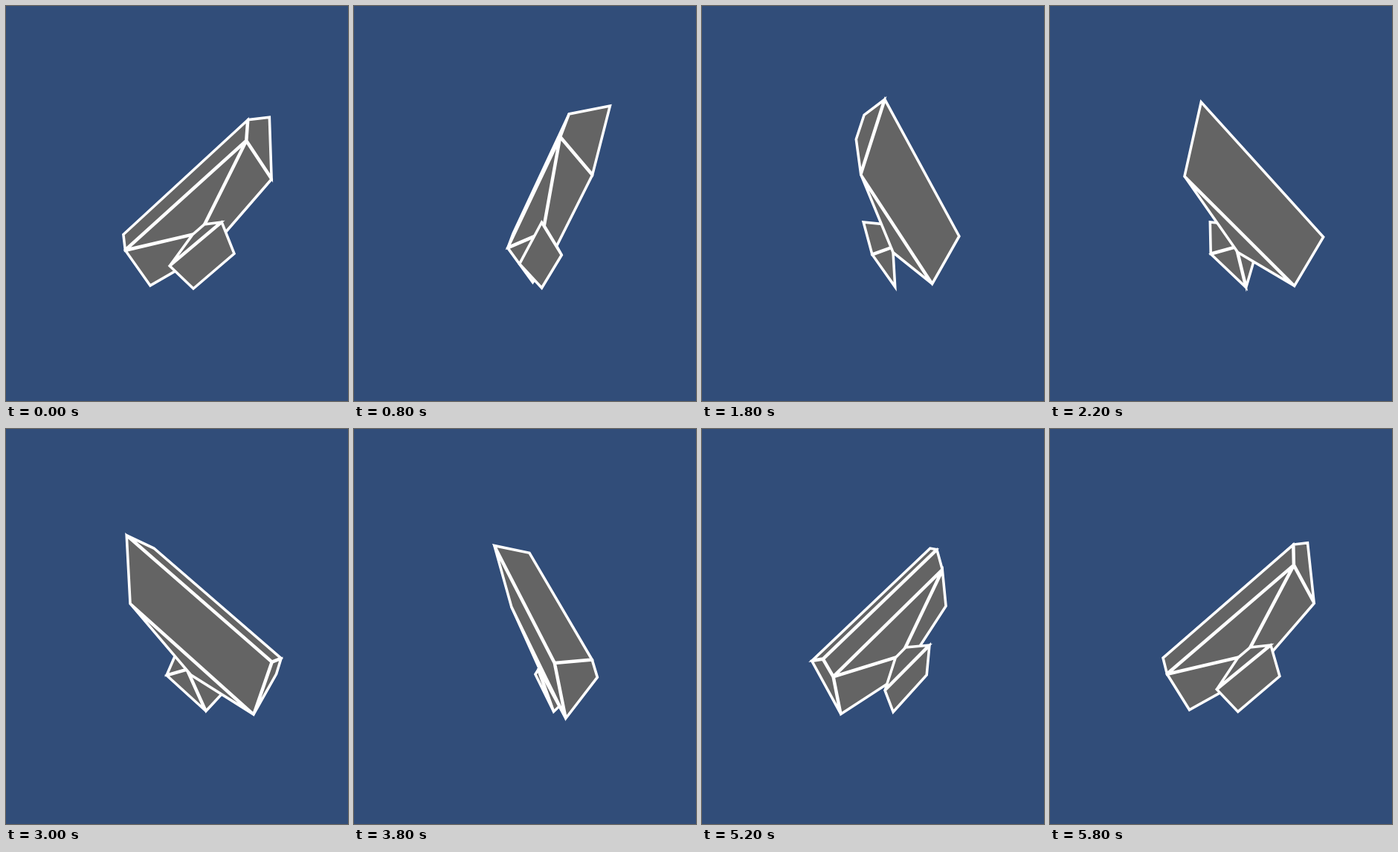
These frames come from a looping animation (460x530 px, 6000 ms). An HTML page with a canvas:

```html
<!DOCTYPE html>
<html>
<head>
<meta charset="utf-8">
<style>
html, body { margin: 0; width: 100%; height: 100%; overflow: hidden; background: #314d79; }
canvas { display: block; }
</style>
</head>
<body>
<canvas id="stage" width="460" height="530"></canvas>
<script>
const ctx = document.getElementById('stage').getContext('2d');
const CX = 260.5, HORIZON = 289.5, CAMERA = 768;
const STEP = 200, STEPS = 30;

// Each solid joins two matching rings of corners [x, y up, z towards the viewer].
const body = solid(
  [[96.5, 144, -18], [95.5, 56, 13], [12, -41, 0], [-69.5, -90, -33], [-88.5, -21, -69]],
  [[63, 133.5, 21.5], [60, 104, 33.5], [1, -14.5, 9.5], [-102, -39, -11], [-106.5, -17.5, -25]]
);
const heel = [17, -33, -2];
const foot = solid(
  [[28.5, 0, 36], [-40, -58, 17], [-8.5, -90, 3], [46, -42, 17]],
  [[6, -3, 12.5], [-10, -17, 8], heel, heel]
);

function solid(front, back) {
  const sides = front.map((corner, i) => {
    const next = (i + 1) % front.length;
    return [back[i], back[next], front[next], corner];
  });
  return [...cap(front), ...cap([...back].reverse()), ...sides];
}

// A five-cornered end is a quad with a triangle folded along its lower edge.
function cap(ring) {
  if (ring.length < 5) return [ring];
  const [a, b, tip, c, d] = ring;
  return [[a, b, c, d], [b, tip, c]];
}

function project([x, y, z], angle) {
  const c = Math.cos(angle), s = Math.sin(angle);
  const scale = CAMERA / (CAMERA - x * s - z * c);
  return [CX + (x * c - z * s) * scale, HORIZON - y * scale];
}

function facesViewer(poly) {
  return poly.reduce((sum, [x, y], i) => {
    const [nx, ny] = poly[(i + 1) % poly.length];
    return sum + x * ny - nx * y;
  }, 0) < 0;
}

// The outline lies mostly inside its face, so shared edges come out heavier.
function drawFace(poly) {
  const path = new Path2D('M' + poly.join('L') + 'Z');
  ctx.save();
  ctx.fill(path);
  ctx.lineWidth = 2.6;
  ctx.stroke(path);
  ctx.clip(path);
  ctx.lineWidth = 4.5;
  ctx.stroke(path);
  ctx.restore();
}

function draw(angle) {
  ctx.fillStyle = '#314d79';
  ctx.fillRect(0, 0, 460, 530);
  ctx.fillStyle = '#646464';
  ctx.strokeStyle = '#fff';
  ctx.miterLimit = 4;
  // The side of the contact plane the camera is on decides the order.
  const footInFront = Math.cos(angle - 0.14) > 0.02;
  const faces = footInFront ? [...body, ...foot] : [...foot, ...body];
  faces
    .map(face => face.map(corner => project(corner, angle)))
    .filter(facesViewer)
    .forEach(drawFace);
}

function tick() {
  const step = Math.floor(performance.now() / STEP) % STEPS;
  draw(step / STEPS * 2 * Math.PI);
  requestAnimationFrame(tick);
}
tick();
</script>
</body>
</html>
```
